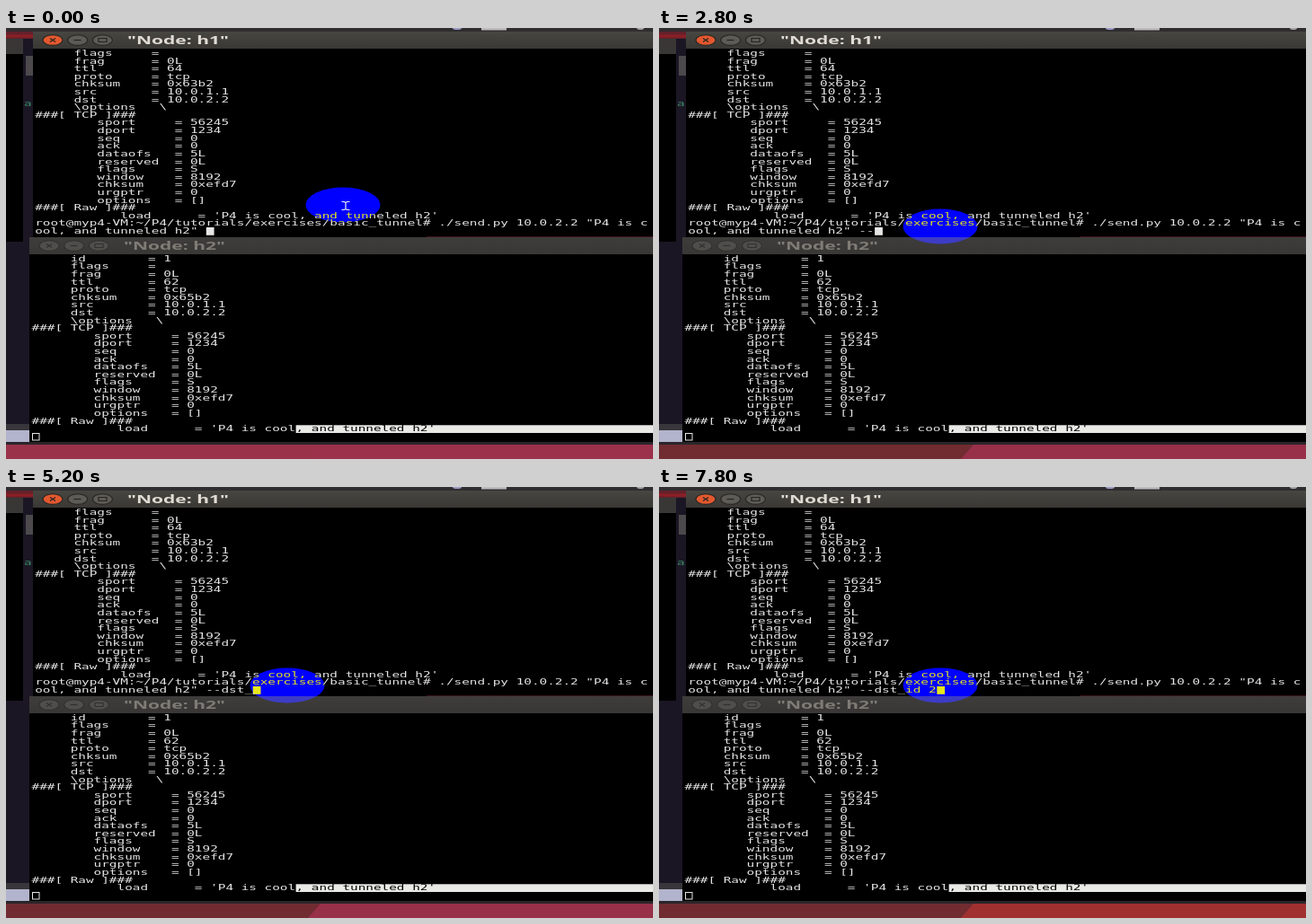
These frames come from a looping animation (720 px wide and 480 px high, 8000 ms). An HTML page with a canvas:

```html
<!DOCTYPE html>
<html lang="en">
<head>
<meta charset="utf-8">
<title>Tunnel terminals</title>
<style>
  html, body { margin: 0; width: 100%; height: 100%; overflow: hidden; background: #000; }
  canvas { display: block; width: 720px; height: 480px; }
</style>
</head>
<body>
<canvas id="stage" width="720" height="480"></canvas>
<script>
const ctx = document.getElementById('stage').getContext('2d');
const LOOP = 8000, STEP = 200;
const CELL = 8.65, ROW = 8.61;
const ASPECT = 1.752; // the whole screen has wide pixels
const MONO = '8.2px "DejaVu Sans Mono", monospace';
const TITLE = 'bold 12px "Open Sans", sans-serif';
const INK = '#e6e6e6';

const field = (indent, width, name, value = '') =>
  ' '.repeat(indent) + name.padEnd(width) + '= ' + value;
const ip = (name, value) => field(5, 10, name, value);
const tcp = (name, value) => field(8, 10, name, value);

const packet = (ttl, chksum) => [
  ip('flags'), ip('frag', '0L'), ip('ttl', ttl), ip('proto', 'tcp'), ip('chksum', chksum),
  ip('src', '10.0.1.1'), ip('dst', '10.0.2.2'), '     \\options   \\',
  '###[ TCP ]###',
  tcp('sport', '56245'), tcp('dport', '1234'), tcp('seq', '0'), tcp('ack', '0'),
  tcp('dataofs', '5L'), tcp('reserved', '0L'), tcp('flags', 'S'), tcp('window', '8192'),
  tcp('chksum', '0xefd7'), tcp('urgptr', '0'), tcp('options', '[]'),
  '###[ Raw ]###',
  field(11, 10, 'load', "'P4 is cool, and tunneled h2'")
];

const sent = [...packet('64', '0x63b2'),
  'root@myp4-VM:~/P4/tutorials/exercises/basic_tunnel# ./send.py 10.0.2.2 "P4 is c'];
const received = [ip('id', '1'), ...packet('62', '0x65b2')];
const command = 'ool, and tunneled h2" ';

// [time, text typed so far]
const typing = [
  [0, ''], [2200, '-'], [2400, '--'], [3200, '--d'], [3400, '--ds'], [3600, '--dst'],
  [5200, '--dst_'], [5600, '--dst_i'], [5800, '--dst_id'], [6000, '--dst_id '], [6600, '--dst_id 2']
];

// [time, left colour, right colour] of the desktop strip
const desktop = [
  [0, '#9a324a', '#9c314b'], [400, '#802c34', '#993148'],
  [2400, '#702c31', '#98304a'], [7800, '#702c30', '#a03030']
];

const at = (table, t) => table.filter(row => row[0] <= t).pop();
const mix = (a, b, k) => a + (b - a) * k;
const ease = k => { k = Math.min(1, Math.max(0, k)); return k * k * (3 - 2 * k); };

function rect(color, x, y, w, h) {
  ctx.fillStyle = color;
  ctx.fillRect(x, y, w, h);
}

function oval(color, x, y, rx, ry) {
  ctx.fillStyle = color;
  ctx.beginPath();
  ctx.ellipse(x, y, rx, ry, 0, 0, Math.PI * 2);
  ctx.fill();
}

function text(str, x, y, color = INK, font = MONO) {
  ctx.save();
  ctx.translate(x, y);
  ctx.scale(ASPECT, 1);
  ctx.font = font;
  ctx.fillStyle = color;
  ctx.fillText(str, 0, 0);
  ctx.restore();
}

const lines = (list, x, y) => list.forEach((s, i) => text(s, x, y + 7 + i * ROW));

function glyph(x, y, color, path) {
  ctx.strokeStyle = color;
  ctx.lineWidth = 1.2;
  ctx.stroke(new Path2D(`M${x} ${y}${path}`));
}

function titleBar(x, y, name, active) {
  const bar = ctx.createLinearGradient(0, y, 0, y + 19);
  bar.addColorStop(0, active ? '#474641' : '#3e3d3b');
  bar.addColorStop(1, active ? '#393834' : '#383735');
  rect(bar, x, y, 720 - x, 19);
  const mark = active ? '#262421' : '#32312f';
  const knob = active ? '#5d5b55' : '#4f4e4b';
  const cy = y + 9.5;
  [0, 1, 2].forEach(i => {
    const cx = x + 22 + i * 27.7;
    oval(mark, cx, cy, 11.5, 6.2);
    oval(active && !i ? '#e2582f' : knob, cx, cy, 10.4, 5.2);
  });
  glyph(x + 19, cy - 2, mark, 'l6 4m0 -4l-6 4');
  glyph(x + 45.5, cy, mark, 'h8');
  glyph(x + 73, cy - 2, mark, 'h9v4h-9z');
  text(`"Node: ${name}"`, x + 105, y + 14.4, active ? '#e0dcd4' : '#7f7c76', TITLE);
}

function backdrop(t) {
  const [, left, right] = at(desktop, t);
  rect('#1b1624', 0, 0, 720, 480);
  rect('#302d30', 0, 0, 720, 4);
  rect('#bcbabc', 529, 0, 28, 2.5);
  oval('#9a9cc4', 502, 0, 5, 2);
  oval('#a5a3a5', 706, 0, 4, 2);
  rect('#64202a', 0, 4, 32, 8);
  rect('#8c1f26', 0, 7.5, 30, 3);
  rect('#383735', 0, 12, 19, 17);
  rect('#000', 0, 29, 19, 209);
  rect('#4b494c', 22, 31, 8, 22);
  text('a', 20, 87, '#3c8a68');
  rect('#38363a', 0, 441, 27, 7);
  rect('#b2b3cc', 0, 448, 27, 14);
  rect(right, 0, 464, 720, 16);
  ctx.fillStyle = left;
  ctx.fill(new Path2D('M0 464H350L336 480H0z'));
  rect('#2a262a', 0, 461, 720, 3);
}

function terminals(typed) {
  rect('#000', 30, 22, 690, 212);
  titleBar(30, 4, 'h1', true);
  lines([...sent, command + typed], 32.2, 24);
  rect(INK, 32.5 + (command + typed).length * CELL, 222, 8.8, 8.8);

  rect('#5b1b25', 468, 232.3, 252, 1);
  rect('#000', 26, 251, 694, 210);
  titleBar(26, 233, 'h2', false);
  lines(received, 28.5, 252.7);
  const cut = 34, x = 28.5 + cut * CELL;
  rect('#e9e9e6', x, 442.3, 720 - x, 8.7);
  text(received.at(-1).slice(cut), x, 252.7 + 7 + 22 * ROW, '#000');
  ctx.strokeStyle = INK;
  ctx.lineWidth = 1;
  ctx.strokeRect(29.5, 451.5, 7.5, 7.5);
}

function pointer(t, showBeam) {
  const go = ease(t / 1000), settle = ease((t - 1000) / 600);
  const x = mix(375, 307, go) + 6 * settle;
  const y = mix(197, 220.5, go) + 0.5 * settle;
  ctx.globalCompositeOperation = 'difference';
  oval('#00f', x, y, 41.5, 19.5);
  ctx.globalCompositeOperation = 'source-over';
  if (!showBeam) return;
  const beam = 'h3l1.5 1l1.5 -1h3m-4.5 1v7m-4.5 1h3l1.5 -1l1.5 1h3';
  glyph(x - 1.5, y - 3.5, '#f0f0f0', beam);
}

function draw(now) {
  const t = Math.floor((now % LOOP) / STEP) * STEP;
  const typed = at(typing, t)[1];
  backdrop(t);
  terminals(typed);
  pointer(t, !typed);
  requestAnimationFrame(() => draw(performance.now() - start));
}

const start = performance.now();
draw(0);
</script>
</body>
</html>
```
